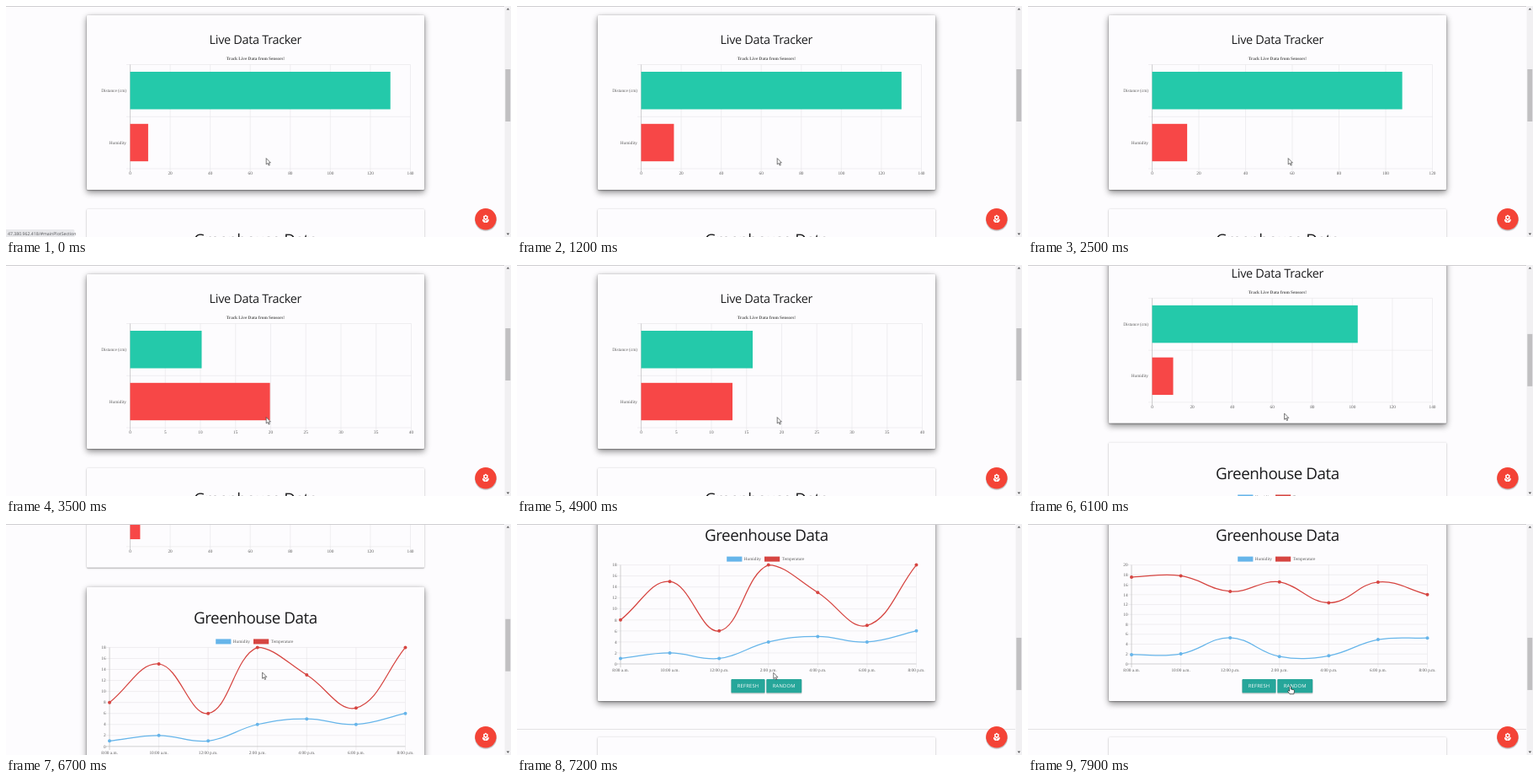
Recreate the animation shown at these times as an HTML page. Size 600 by 274 pixels, loop 8 s.

```html
<!DOCTYPE html>
<html lang="en">
<head>
<meta charset="utf-8">
<title>Sensor dashboard</title>
<style>
html, body { margin: 0; width: 100%; height: 100%; overflow: hidden; background: #fdfcfe; }
#stage { position: relative; width: 600px; height: 274px; overflow: hidden; }
#page { position: absolute; inset: 0; }
svg { position: absolute; left: 0; top: 0; overflow: visible; text-rendering: geometricPrecision; }
.card {
  position: absolute; left: 95.5px; width: 401.5px; border-radius: 1px; background: #fdfcfe;
  box-shadow: 0 1px 1px rgba(0,0,0,.14), 0 1.3px .5px -1px rgba(0,0,0,.12), 0 .5px 2.2px rgba(0,0,0,.3);
}
.card::after {
  content: ""; position: absolute; inset: 0; border-radius: 1px; opacity: var(--lift, 0);
  box-shadow: 0 3.5px 7.5px rgba(0,0,0,.26), 0 2.6px 8.8px rgba(0,0,0,.22);
}
.rule { position: absolute; left: 0; width: 592px; height: 1px; top: 506.5px; background: #e3e2e4; }
.head { font-family: "Open Sans", "Noto Sans", sans-serif; fill: #1c1c1e; text-anchor: middle; }
.chart { font: 5.27px "Liberation Serif", "Times New Roman", serif; fill: #5c5c5c; }
.mid { text-anchor: middle; }
.end { text-anchor: end; }
.grid { stroke: #e6e5e8; stroke-width: .6; fill: none; }
.zero { stroke: #bcbcbe; stroke-width: .7; fill: none; }
.btn { font: 500 5.8px "Open Sans", "Noto Sans", sans-serif; letter-spacing: .22px; fill: #fff; text-anchor: middle; }
.status { font: 5.2px "Open Sans", "Noto Sans", sans-serif; fill: #55565a; }
</style>
</head>
<body>
<div id="stage">
  <div id="page">
    <div class="card" id="liveCard" style="top:11px;height:207px"></div>
    <div class="card" id="houseCard" style="top:241px;height:233px"></div>
    <div class="rule"></div>
    <div class="card" style="top:517px;height:200px"></div>
    <svg width="600" height="620">
      <text class="head" x="296.4" y="45.3" font-size="14.4" letter-spacing="-.28">Live Data Tracker</text>
      <g class="chart">
        <text class="mid" x="296.4" y="64.4" font-weight="bold">Track Live Data from Sensors!</text>
        <g id="liveAxis"></g>
        <rect id="barD" x="147.5" y="78" height="44.5" fill="#24c9aa"/>
        <rect id="barH" x="147.5" y="139.8" height="44.4" fill="#f74747"/>
        <text class="end" x="143" y="101.7">Distance (cm)</text>
        <text class="end" x="143" y="163.5">Humidity</text>
      </g>
      <text class="head" x="296.4" y="284" font-size="18.8" letter-spacing="-.45">Greenhouse Data</text>
      <g class="chart">
        <rect x="249.2" y="302.6" width="18.2" height="6" fill="#66b5ea"/>
        <text x="269.8" y="307.3">Humidity</text>
        <rect x="294" y="302.6" width="18.2" height="6" fill="#d64541"/>
        <text x="314.8" y="307.3">Temperature</text>
        <g id="houseAxis"></g>
        <g id="lines"></g>
      </g>
      <g id="buttons"></g>
    </svg>
  </div>
  <svg width="600" height="274">
    <rect width="592" height="1" fill="#cfced1"/>
    <rect x="592.5" width="7.5" height="274" fill="#f1f0f2"/>
    <path d="M594.6 4.6l1.8-2.2 1.8 2.2zM594.6 269.6l1.8 2.2 1.8-2.2z" fill="#505052"/>
    <rect id="thumb" x="593.3" width="6" height="62" fill="#c1c0c2"/>
    <circle cx="570" cy="254.3" r="13" fill="#000" opacity=".1"/>
    <circle cx="570" cy="253.6" r="13" fill="#000" opacity=".14"/>
    <circle cx="569.9" cy="252.7" r="12.7" fill="#f44336"/>
    <g id="flower" transform="translate(564.6 247.4) scale(.44)" fill="#fff"></g>
    <g id="status">
      <path d="M0 265H79.5Q81.5 265 81.5 267V274H0Z" fill="#e8e8eb"/>
      <text class="status" x="2" y="271.8" textLength="0">47.380.962.418/#mainPlotSection</text>
    </g>
    <g id="cursor" stroke-linejoin="round">
      <path id="arrow" d="M0 0V7.3L1.7 5.8 2.9 8.5 4.1 8 2.9 5.4H5.2Z" fill="#fff" stroke="#333" stroke-width=".65"/>
      <path id="hand" d="M-.9.8Q0-.7.9.8V3.6L4.3 4.4Q5.1 4.7 4.9 5.7L4.2 9.3H-.6L-3 6Q-2.6 4.6-.9 5.8Z" fill="#fff" stroke="#222" stroke-width=".7"/>
    </g>
  </svg>
</div>
<script>
const LOOP = 8000;
const $ = id => document.getElementById(id);
const clamp = v => Math.max(0, Math.min(1, v));
const lerp = (a, b, p) => a + (b - a) * p;
const span = (t, from, to) => clamp((t - from) / (to - from));
const quart = p => 1 - (1 - p) ** 4;
const smooth = p => p * p * (3 - 2 * p);
$('status').lastElementChild.removeAttribute('textLength');

// Live bars: each reading eases in over one second, the axis switches at once
const LEFT = 147.5;
const readings = [
  { at: -2000, max: 140, d: 130, h: 9 },
  { at: 30, max: 140, d: 128, h: 15 },
  { at: 950, max: 140, d: 131, h: 17 },
  { at: 1850, max: 120, d: 107, h: 15 },
  { at: 2790, max: 40, d: 10, h: 20 },
  { at: 3850, max: 40, d: 20, h: 16 },
  { at: 4790, max: 40, d: 9, h: 8 },
  { at: 5800, max: 140, d: 125, h: 5 }
];
const plotWidth = max => max === 40 ? 334 : 333;
const barWidth = (v, max) => v / max * plotWidth(max);

let liveMax = 0;
function drawLiveAxis(max) {
  if (max === liveMax) return;
  liveMax = max;
  const step = max === 40 ? 5 : 20, right = LEFT + plotWidth(max);
  let grid = '', labels = '';
  for (let v = 0; v <= max; v += step) {
    const x = LEFT + barWidth(v, max);
    if (v) grid += `M${x} 69.5V197`;
    labels += `<text class="mid" x="${x}" y="200.3">${v}</text>`;
  }
  for (const y of [69.5, 131.3, 193]) grid += `M143 ${y}H${right}`;
  $('liveAxis').innerHTML = `<path class="grid" d="${grid}"/><path class="zero" d="M${LEFT} 69.5V197"/>${labels}`;
}

function drawLive(t) {
  let i = readings.length - 1;
  while (i > 0 && readings[i].at > t) i--;
  const now = readings[i], old = readings[Math.max(0, i - 1)];
  const p = quart(clamp((t - now.at) / 1000));
  drawLiveAxis(now.max);
  for (const [id, key] of [['barD', 'd'], ['barH', 'h']])
    $(id).setAttribute('width', lerp(barWidth(old[key], old.max), barWidth(now[key], now.max), p));
}

// Greenhouse curves
const TOP = 312.6, BASE = 430, X0 = 123, GAP = 58.58, RANDOM_AT = 7517;
const hours = ['8:00 a.m.', '10:00 a.m.', '12:00 p.m.', '2:00 p.m.', '4:00 p.m.', '6:00 p.m.', '8:00 p.m.'];
const series = [
  { color: '#d64541', from: [8, 15, 6, 18, 13, 7, 18], to: [19, 18, 16, 16, 12, 18, 13] },
  { color: '#66b5ea', from: [1, 2, 1, 4, 5, 4, 6], to: [2, 2, 6, 1, 1, 5, 5] }
];

// Returns points with their two handles: [x, y, inX, inY, outX, outY]
function spline(values, max) {
  const pts = values.map((v, i) => [X0 + i * GAP, BASE - v / max * (BASE - TOP)]);
  const cap = y => Math.max(TOP, Math.min(BASE, y));
  return pts.map(([x, y], i) => {
    const a = pts[i - 1] || [x, y], b = pts[i + 1] || [x, y];
    const da = Math.hypot(x - a[0], y - a[1]), db = Math.hypot(b[0] - x, b[1] - y);
    const ka = .4 * da / (da + db), kb = .4 * db / (da + db);
    const dx = b[0] - a[0], dy = b[1] - a[1];
    return [x, y, x - ka * dx, cap(y - ka * dy), x + kb * dx, cap(y + kb * dy)];
  });
}

for (const s of series) {
  s.a = spline(s.from, 18);
  s.b = spline(s.to, 20);
}
$('lines').innerHTML = [...series].reverse().map(s =>
  `<path fill="none" stroke="${s.color}" stroke-width="1.25"/>` +
  `<g fill="${s.color}">${hours.map((_, i) => `<circle cx="${X0 + i * GAP}" r="2"/>`).join('')}</g>`).join('');
[...series].reverse().forEach((s, i) => {
  s.path = $('lines').children[2 * i];
  s.dots = $('lines').children[2 * i + 1].children;
});

let houseMax = 0;
function drawHouseAxis(max) {
  if (max === houseMax) return;
  houseMax = max;
  const right = X0 + 6 * GAP;
  let grid = '', labels = '';
  for (let v = 0; v <= max; v += 2) {
    const y = BASE - v / max * (BASE - TOP);
    if (v) grid += `M118.6 ${y}H${right}`;
    labels += `<text class="end" x="118.6" y="${y + 1.7}">${v}</text>`;
  }
  hours.forEach((h, i) => {
    const x = X0 + i * GAP;
    if (i) grid += `M${x} ${TOP}V434.2`;
    labels += `<text class="mid" x="${x}" y="438.7">${h}</text>`;
  });
  $('houseAxis').innerHTML = `<path class="grid" d="${grid}"/>` +
    `<path class="zero" d="M${X0} ${TOP}V434.2M118.6 ${BASE}H${right}"/>${labels}`;
}

function drawHouse(t) {
  const p = quart(clamp((t - RANDOM_AT) / 1000));
  drawHouseAxis(t < RANDOM_AT ? 18 : 20);
  for (const s of series) {
    const k = s.a.map((pt, i) => pt.map((v, j) => lerp(v, s.b[i][j], p)));
    let d = `M${k[0][0]} ${k[0][1]}`;
    for (let i = 1; i < k.length; i++)
      d += `C${k[i - 1][4]} ${k[i - 1][5]} ${k[i][2]} ${k[i][3]} ${k[i][0]} ${k[i][1]}`;
    s.path.setAttribute('d', d);
    k.forEach((pt, i) => s.dots[i].setAttribute('cy', pt[1]));
  }
}

const button = (x, w, label) =>
  `<rect x="${x - .3}" y="448.6" width="${w + .6}" height="16.8" rx="1" opacity=".2"/>` +
  `<rect x="${x}" y="448" width="${w}" height="16.2" rx=".9" fill="#26a69a"/>` +
  `<text class="btn" x="${x + w / 2}" y="458.2">${label}</text>`;
$('buttons').innerHTML = button(254.5, 40, 'REFRESH') + button(296.3, 41.9, 'RANDOM');

let petals = '';
for (let i = 0; i < 6; i++) {
  const a = (i * 60 - 90) * Math.PI / 180;
  petals += `<circle cx="${12 + 4.5 * Math.cos(a)}" cy="${8 + 4.5 * Math.sin(a)}" r="2.6"/>`;
}
$('flower').innerHTML = petals + '<circle cx="12" cy="8" r="2.5" fill="#f44336"/>' +
  '<path d="M12 22Q12 13 21 13 21 22 12 22ZM12 22Q12 13 3 13 3 22 12 22Z"/>';

// Six wheel notches of 44px
function scrollAt(t) {
  let y = 0;
  for (let i = 0; i < 6; i++) {
    const p = span(t, 6022 + i * 194.7, 6202 + i * 194.7);
    y += 44 * (1 - (1 - p) ** 2);
  }
  return y;
}

function drawFrame(t) {
  const y = scrollAt(t);
  $('page').style.transform = `translateY(${-y}px)`;
  $('thumb').setAttribute('y', 75 + y * .227);
  $('liveCard').style.setProperty('--lift', 1 - smooth(span(t, 6164, 6414)));
  $('houseCard').style.setProperty('--lift', smooth(span(t, 6267, 6517)));
  $('status').style.opacity = 1 - span(t, 300, 450);

  const m1 = smooth(span(t, 5550, 5950)), m2 = smooth(span(t, 7180, 7420));
  const cx = lerp(lerp(309.2, 304.6, m1), 311.6, m2);
  const cy = lerp(lerp(180.6, 176, m1), 192.4, m2);
  $('cursor').setAttribute('transform', `translate(${cx} ${cy})`);
  const over = m2 > 0 && cy > 448 - y;
  $('arrow').style.display = over ? 'none' : '';
  $('hand').style.display = over ? '' : 'none';

  drawLive(t);
  drawHouse(t);
}

const start = performance.now();
function tick() {
  drawFrame((performance.now() - start) % LOOP);
  requestAnimationFrame(tick);
}
tick();
</script>
</body>
</html>
```
